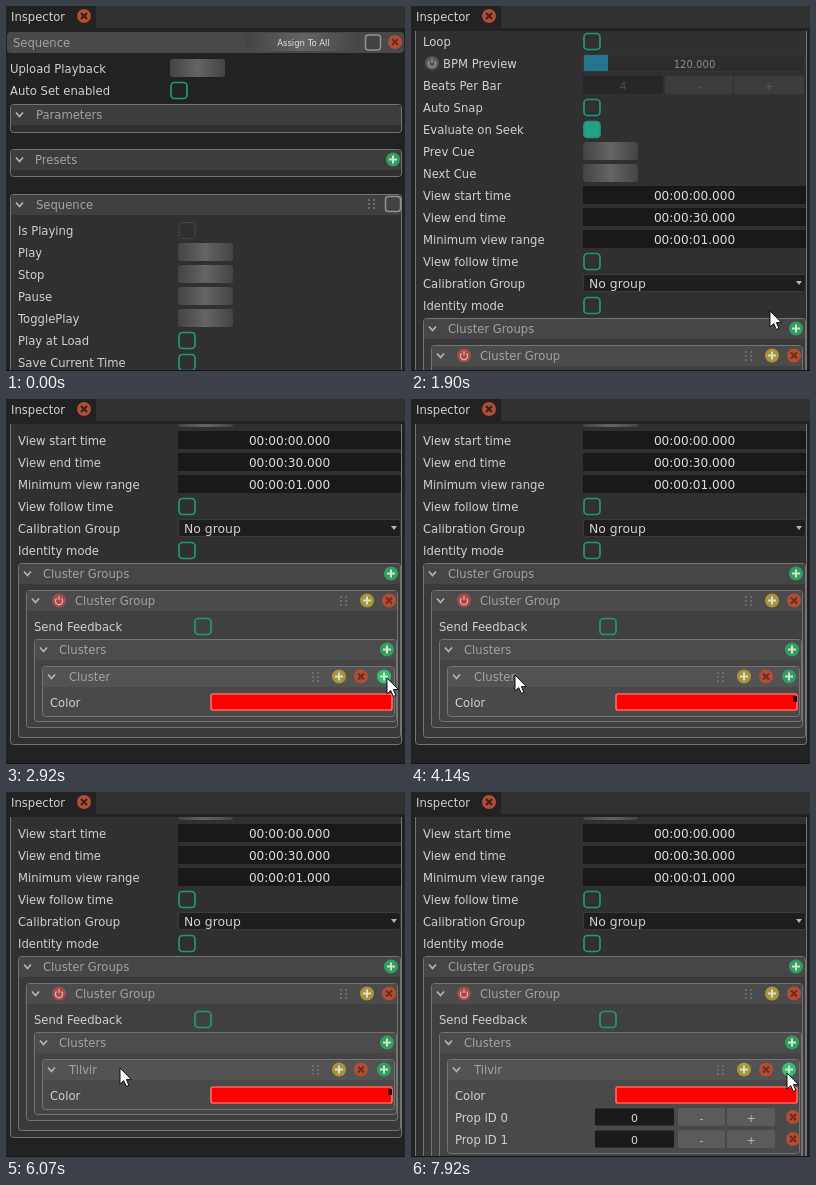
Write an HTML page that moves like this. It is 399x365 px and loops after 8 s.

```html
<!DOCTYPE html>
<html lang="en">
<head>
<meta charset="utf-8">
<title>Inspector panel</title>
<style>
  html, body { margin: 0; width: 100%; height: 100%; overflow: hidden; background: #222; }
  svg { display: block; }
  text { font: 11.6px "DejaVu Sans", sans-serif; fill: #d0d0d0; white-space: pre; }
  .mid { text-anchor: middle; }
  .head { fill: #a2a2a2; }
</style>
</head>
<body>
<script>
const LOOP = 8000, TICK = 67.75, ROW = 22;
const NAME = 'Tilvir';

function el(parent, tag, attrs = {}, text) {
  const node = document.createElementNS('http://www.w3.org/2000/svg', tag);
  for (const key in attrs) node.setAttribute(key, attrs[key]);
  if (text !== undefined) node.textContent = text;
  parent.append(node);
  return node;
}
const rect = (p, x, y, width, height, fill, more) =>
  el(p, 'rect', { x, y, width, height, fill, ...more });
const stroke = (p, d, color, w, more) =>
  el(p, 'path', { d, fill: 'none', stroke: color, 'stroke-width': w, ...more });
const label = (p, x, y, s, more) => el(p, 'text', { x, y: y + 5, ...more }, s);
const centred = (p, x, y, s, size, fill) =>
  label(p, x, y, s, { class: 'mid', style: `font-size:${size}px;fill:${fill}` });

const svg = el(document.body, 'svg', { width: 399, height: 365, viewBox: '0 0 399 365' });
const defs = el(svg, 'defs');
const glow = el(defs, 'linearGradient', { id: 'glow' });
['#444', '#646464', '#444'].forEach((color, i) =>
  el(glow, 'stop', { offset: i / 2, 'stop-color': color }));
rect(el(defs, 'clipPath', { id: 'view' }), 0, 25, 399, 339);

// Controls
const trigger = (p, x, y) => rect(p, x, y - 9, 55, 18, 'url(#glow)', { rx: 3 });

function check(p, x, y, mode) {
  const off = mode === 'off';
  rect(p, x + 1, y - 7.5, 16, 16, mode === 'on' ? '#20a284' : 'none', {
    rx: 3.5, stroke: off ? '#3b5c52' : '#1f987c',
    'stroke-width': off ? 1 : 1.7, 'stroke-dasharray': off ? '2 1' : 'none'
  });
}
function timeBox(p, y, s) {
  rect(p, 172, y - 9, 223, 18, '#191919');
  centred(p, 283.5, y, s, 12.1, '#dcdcdc');
}
function stepButton(p, x, y, w, s, fill, color) {
  rect(p, x, y - 9, w, 18, fill, { rx: 2 });
  centred(p, x + w / 2, y, s, 11, color);
}
const disc = (p, x, y, fill) => el(p, 'circle', { cx: x, cy: y, r: 7, fill });

function plus(p, x, y, fill = '#2f9f62') {
  const node = disc(p, x, y, fill);
  stroke(p, `M${x - 4} ${y}h8M${x} ${y - 4}v8`, '#d8dfcc', 2);
  return node;
}
function cross(p, x, y, ink = '#6a2d1e') {
  disc(p, x, y, '#b34d34');
  stroke(p, `M${x - 3} ${y - 3}l6 6m0-6l-6 6`, ink, 2);
}
function power(p, x, y, fill, color) {
  disc(p, x, y, fill);
  stroke(p, `M${x - 2.5} ${y - 2}a3.6 3.6 0 1 0 5 0M${x} ${y - 4.5}v4`, color, 1.2);
}
function grip(p, x, y) {
  for (let i = 0; i < 6; i++)
    rect(p, x - 4 + (i % 2) * 5, y - 5 + (i >> 1) * 4, 2, 2, '#6c6c6c');
}
const tick = (p, x, y, w = 16) =>
  rect(p, x - w / 2 + .5, y - 7.5, w - 1, 15, '#424242', { rx: 3, stroke: '#929292', 'stroke-width': 1.5 });

// Titled container; the outline is returned so that it can be resized.
function panel(p, x, y, right, height, title, body, head, titleX = x + 26) {
  const outline = rect(p, x + .5, y + .5, right - x - 1, height, body, { rx: 3, stroke: '#747474' });
  rect(p, x + 1, y + 1, right - x - 2, 20, head, { rx: 2 });
  stroke(p, `M${x + 6} ${y + 8.5}l3.5 4l3.5-4`, '#b4b4b4', 1.8);
  outline.title = label(p, titleX, y + 9.5, title, { class: 'head' });
  return outline;
}

// Scrolled page
const clip = el(svg, 'g', { 'clip-path': 'url(#view)' });
const page = el(clip, 'g');

rect(page, 1, 26, 397, 21, '#484848', { rx: 4 });
label(page, 7, 35.5, 'Sequence', { class: 'head' });
rect(page, 240, 27, 114, 18, 'url(#glow)', { rx: 3 });
centred(page, 297.5, 34.5, 'Assign To All', 8.5, '#e0e0e0');
tick(page, 367, 36.5);
cross(page, 389, 36);
label(page, 4, 62, 'Upload Playback');
trigger(page, 164, 62);
label(page, 4, 84, 'Auto Set enabled');
check(page, 164, 84);
panel(page, 4, 98, 396, 28, 'Parameters', '#2f2f2f', '#3d3d3d');
panel(page, 4, 143, 396, 27, 'Presets', '#2f2f2f', '#3d3d3d', 29);
plus(page, 387, 153.5);
const sequence = panel(page, 4, 188, 396, 566, 'Sequence', '#303030', '#404040');
grip(page, 366, 198);
tick(page, 387, 198);

const draw = {
  trigger: y => trigger(page, 172, y),
  check: (y, mode) => check(page, 172, y, mode),
  time: (y, s) => timeBox(page, y, s),
  slider(y) {
    rect(page, 172.5, y - 8.5, 221, 17, '#2d2d2d', { rx: 2, stroke: '#363636' });
    rect(page, 173, y - 8, 24, 16, '#25758f');
    centred(page, 283.5, y - .5, '120.000', 10.1, '#8c8c8c');
    power(page, 21, y, '#585858', '#a0a0a0');
  },
  beats(y) {
    rect(page, 172, y - 9, 80, 18, '#272727');
    centred(page, 212, y, '4', 11, '#38525c');
    stepButton(page, 254, y, 68, '-', '#3c3c3c', '#5a5a5a');
    stepButton(page, 323, y, 70, '+', '#3c3c3c', '#5a5a5a');
  },
  combo(y, s) {
    rect(page, 172.5, y - 8.5, 222, 17, '#1e1e1e', { rx: 2, stroke: '#3b3b3b' });
    label(page, 178, y, s, { style: 'font-size:12.4px' });
    el(page, 'path', { d: `M385 ${y - 2}h6l-3 4z`, fill: '#b8b8b8' });
  }
};
const rows = [
  ['Is Playing', 'check', 'off'], ['Play', 'trigger'], ['Stop', 'trigger'],
  ['Pause', 'trigger'], ['TogglePlay', 'trigger'], ['Play at Load', 'check'],
  ['Save Current Time', 'check'], ['Current Time', 'time', '00:00:00.000'],
  ['Total Time', 'time', '00:00:30.000'], ['Play Speed', 'time', '1.000'],
  ['Loop', 'check'], ['BPM Preview', 'slider'], ['Beats Per Bar', 'beats'],
  ['Auto Snap', 'check'], ['Evaluate on Seek', 'check', 'on'],
  ['Prev Cue', 'trigger'], ['Next Cue', 'trigger'],
  ['View start time', 'time', '00:00:00.000'], ['View end time', 'time', '00:00:30.000'],
  ['Minimum view range', 'time', '00:00:01.000'], ['View follow time', 'check'],
  ['Calibration Group', 'combo', 'No group'], ['Identity mode', 'check']
];
rows.forEach(([name, kind, value], i) => {
  const y = 224 + ROW * i;
  label(page, kind === 'slider' ? 32 : 12, y, name);
  draw[kind](y, value);
});

// Cluster groups, placed as seen at the lowest scroll position
const LOW = 557;
const lower = el(page, 'g', { transform: `translate(0 ${LOW})` });
const groups = panel(lower, 12, 164, 395, 26, 'Cluster Groups', '#3a3a3a', '#464646', 37);
const groupsPlus = plus(lower, 385, 174.5);
const open = el(lower, 'g');
const group = panel(open, 20, 191, 392, 137, 'Cluster Group', '#404040', '#4b4b4b', 69);
power(open, 53, 201.5, '#a84a4a', '#e0b4b4');
grip(open, 338, 202);
plus(open, 361, 201.5, '#a8953a');
cross(open, 383, 201.5);
label(open, 28, 227, 'Send Feedback');
check(open, 188, 227);
const clusters = panel(open, 28, 240, 391, 82, 'Clusters', '#444', '#4c4c4c', 53);
plus(open, 381, 250.5);
const cluster = panel(open, 36, 267, 389, 50, 'Cluster', '#494949', '#535353', 63);
grip(open, 310, 278);
plus(open, 333, 277.5, '#a8953a');
cross(open, 355, 277.5);
const clusterPlus = plus(open, 378, 277.5);
label(open, 44, 303, 'Color');
rect(open, 205, 295, 181, 16, '#f00', { rx: 2, stroke: '#ff665e', 'stroke-width': 1.7 });
const speck = rect(open, 382, 297, 4, 6, '#300000');

const props = [0, 1].map(i => {
  const g = el(open, 'g'), y = 325 + ROW * i;
  label(g, 44, y, 'Prop ID ' + i);
  rect(g, 184, y - 8.5, 79, 17, '#1a1a1a', { rx: 1 });
  centred(g, 223.5, y, '0', 11, '#d8d8d8');
  stepButton(g, 267, y, 47, '-', '#5b5b5b', '#c0c0c0');
  stepButton(g, 316, y, 48, '+', '#5b5b5b', '#c0c0c0');
  cross(g, 382, y);
  return g;
});

const selection = rect(open, 63, 271, 41, 14, '#42a2c8', { opacity: .4 });
const caret = rect(open, 63, 271, 1.5, 14, '#e4e4e4');

// Fixed tab bar
rect(svg, 90, 0, 309, 22, '#313131');
label(svg, 5, 10, 'Inspector');
cross(svg, 78, 10, '#33211c');
rect(svg, 0, 364, 399, 1, '#161616');

const cursor = el(svg, 'path', {
  d: 'M0 0v16l3.7-3.4l2.6 5.8l2.6-1.1l-2.5-5.7h5z',
  fill: '#fff', stroke: '#111', 'stroke-width': 1
});

// Timeline
const scrolls = [[0, 0], [70, 82], [140, 164], [200, 245], [270, 327], [410, 409], [1970, 483], [2040, LOW]];
const adds = [[0, 0], [7440, 1], [7850, 2]];
const typed = [5140, 5340, 5470, 5600, 5740, 5860];
const path = [
  [0, 326, 287], [745, 326, 287], [950, 380, 318], [1150, 380, 318],
  [1400, 361, 345], [1620, 361, 345], [1880, 359, 305], [2170, 359, 305],
  [2500, 374, 270], [2910, 381, 279], [3580, 381, 279], [3850, 270, 267],
  [4130, 104, 276], [4260, 93, 275], [4400, 107, 276], [5900, 107, 276],
  [6000, 114, 276], [6460, 114, 276], [6800, 205, 238], [7050, 310, 248],
  [7290, 375, 278], [7700, 375, 278], [7900, 376, 281]
];

const stepAt = (list, t) => list.reduce((v, [at, next]) => t >= at ? next : v, 0);

function cursorAt(t) {
  const i = path.findIndex(p => p[0] > t);
  if (i < 0) return path[path.length - 1].slice(1);
  const [t0, x0, y0] = path[i - 1], [t1, x1, y1] = path[i];
  const u = (t - t0) / (t1 - t0), k = u * u * (3 - 2 * u);
  return [x0 + (x1 - x0) * k, y0 + (y1 - y0) * k];
}
const show = (node, on) => node.setAttribute('visibility', on ? 'inherit' : 'hidden');

function render(t) {
  const scroll = stepAt(scrolls, t), count = stepAt(adds, t);
  const expanded = t >= 1150, grow = ROW * count;
  page.setAttribute('transform', `translate(0 ${-scroll})`);

  show(open, expanded);
  sequence.setAttribute('height', expanded ? 714 + grow : 566);
  groups.setAttribute('height', expanded ? 174 + grow : 26);
  group.setAttribute('height', 137 + grow);
  clusters.setAttribute('height', 82 + grow);
  cluster.setAttribute('height', 50 + grow);
  props.forEach((g, i) => show(g, expanded && i < count));
  show(speck, expanded && t >= 3650 && t < 7440);

  // Rename the cluster
  const letters = typed.filter(at => t >= at).length;
  const title = cluster.title;
  const word = letters ? NAME.slice(0, letters) : 'Cluster';
  if (title.textContent !== word) title.textContent = word;
  const editing = t >= 4480 && t < 6000;
  show(selection, editing && !letters);
  show(caret, editing && (letters > 0 || t >= 4870));
  if (editing) caret.setAttribute('x', letters ? 63 + title.getComputedTextLength() : 63);

  // The pointer was sampled at a steady rate
  const [x, y] = cursorAt(Math.floor((t + 15) / TICK) * TICK);
  cursor.setAttribute('transform', `translate(${x.toFixed(1)} ${y.toFixed(1)})`);
  show(cursor, t >= 70 && !(t >= 4540 && t < 6000));
  const lit = (node, cx, cy) =>
    node.setAttribute('fill', Math.hypot(x - cx, y - cy) < 8 ? '#30c070' : '#2f9f62');
  lit(groupsPlus, 385, 174 + LOW - scroll);
  lit(clusterPlus, 378, 277 + LOW - scroll);
}

const start = performance.now();
function frame() {
  render((performance.now() - start) % LOOP);
  requestAnimationFrame(frame);
}
frame();
</script>
</body>
</html>
```
